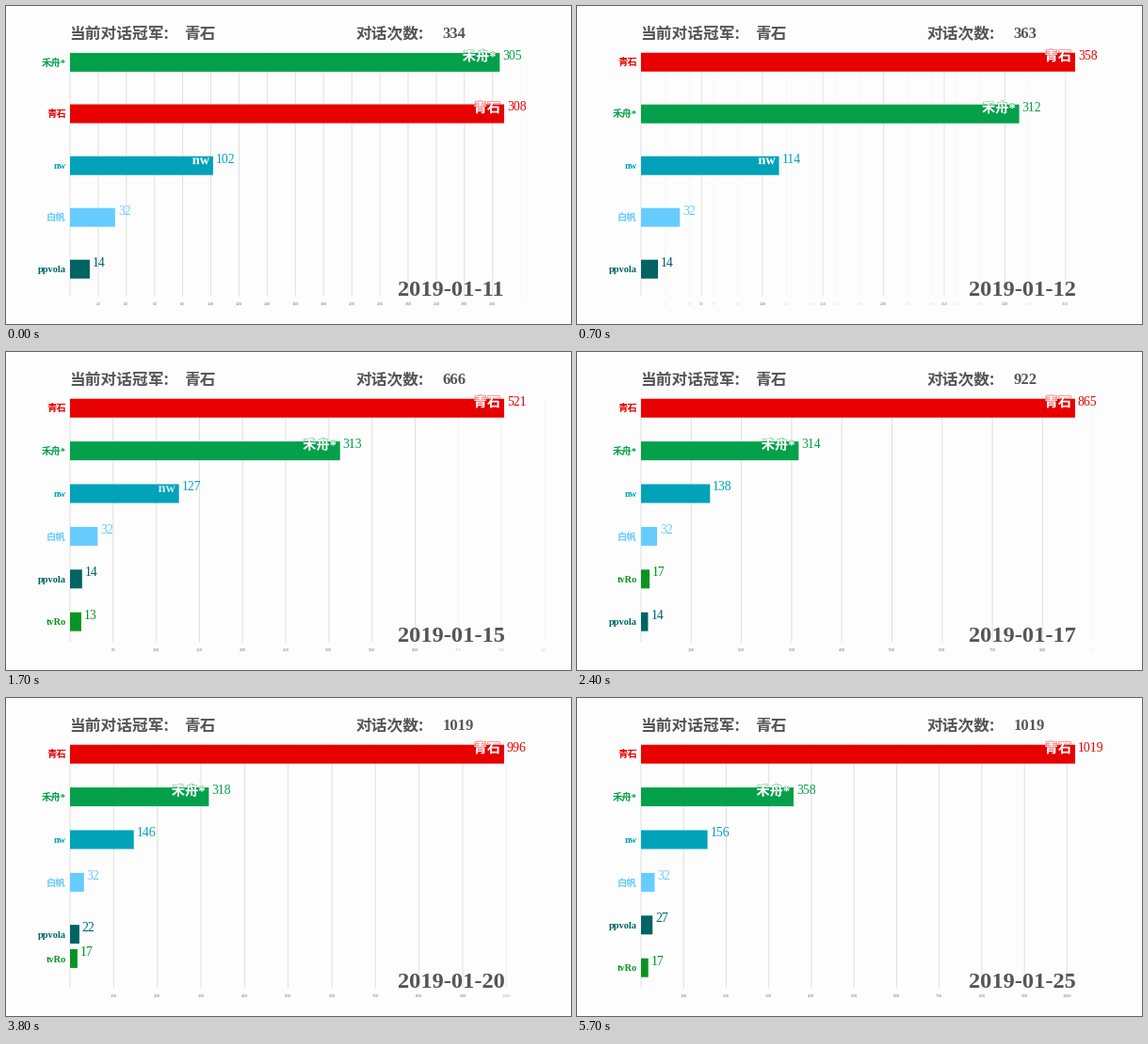
A matplotlib script for the animation above (6 s loop, 600 by 338 pixels).

```python
import math

import matplotlib.pyplot as plt
from matplotlib.animation import FuncAnimation
from matplotlib.patches import Rectangle
from matplotlib.patheffects import withStroke

W, H, DPI = 600, 338, 100
FRAMES, STEP = 60, 100
DAY_MS, LEAD = 400, 0.085      # length of a day, progress already made at t = 0
X0, SPAN, TOP, BAR = 68, 461, 49.7, 20
GREY = "#555555"
SERIF = ["Liberation Serif", "Noto Sans CJK JP"]
SANS = ["Noto Sans CJK JP"]

# name, colour, one value per day (first entry is the day before the start)
SERIES = [
    ("禾舟*", "#04a04a", [305, 306, 313, 313, 313, 313, 314, 314,
                        316, 317, 319, 319, 331, 354, 357, 360]),
    ("青石", "#e80000", [306, 334, 363, 405, 448, 666, 860, 922,
                       943, 963] + [1019] * 6),
    ("nw", "#00a2b9", [101, 108, 115, 119, 125, 130, 137, 144,
                       144, 145, 147, 147, 151, 155, 155, 158]),
    ("白帆", "#66ccff", [32] * 16),
    ("ppvola", "#006464", [14] * 10 + [27] * 6),
    ("tvRo", "#089422", [0] * 3 + [13] * 3 + [17] * 10),
]

fig = plt.figure(figsize=(W / DPI, H / DPI), dpi=DPI, facecolor="#fdfdfd")
ax = fig.add_axes([0, 0, 1, 1])


def px(n):
    return n * 72 / DPI


def lerp(a, b, f):
    return a + (b - a) * f


def ease(u):
    u = min(u / 0.94, 1)
    return 4 * u ** 3 if u < 0.5 else 1 - 4 * (1 - u) ** 3


def text(x, y, s, size, color=GREY, family=SERIF, weight="bold", **kw):
    return ax.text(x, y, s, fontsize=px(size), color=color, family=family,
                   weight=weight, va="baseline", **kw)


def values(day):
    return [s[2][day] for s in SERIES]


def row_tops(day):
    """Top edge of every bar on a day; None while a series is absent."""
    vals = values(day)
    shown = [i for i, v in enumerate(vals) if v]
    if day:
        shown.sort(key=lambda i: -vals[i])
    gap = 55 if len(shown) == 5 else 45.4
    return [TOP + gap * shown.index(i) if i in shown else None
            for i in range(len(vals))]


def ticks(top):
    raw = top / 11
    base = 10 ** math.floor(math.log10(raw))
    err = raw / base
    step = base * (10 if err >= 50 ** 0.5 else 5 if err >= 10 ** 0.5
                   else 2 if err >= 2 ** 0.5 else 1)
    return {round(i * step) for i in range(int(top / step) + 1)}


def draw_axis(old_max, new_max, f):
    scale = SPAN * lerp(1 / old_max, 1 / new_max, f)
    old, new = ticks(old_max), ticks(new_max)
    for v in old | new:
        alpha = 1 if v in old & new else f if v in new else 1 - f
        x = X0 + v * scale
        if x > W:
            continue
        ax.plot([x, x], [TOP, 308], color="#e0e0e0", lw=px(1),
                alpha=alpha, zorder=1, snap=False)
        if v:
            text(x, 318.5, str(v), 4.4, "#808080", ["Liberation Sans"],
                 "normal", ha="center", alpha=alpha)


def draw_bar(name, color, a, b, y, widths, f):
    alpha = 1 if a else f
    w = lerp(*widths, f)
    ax.add_patch(Rectangle((X0, y), w, BAR, fc=color, lw=0, alpha=alpha,
                           zorder=2, snap=False))
    text(64, y + 13.6, name, 10.4, color, ha="right", alpha=alpha)
    text(X0 + w + 2.9, y + 6.9, str(round(lerp(a, b, f))), 13.8, color,
         weight="normal", alpha=alpha)
    inner = lerp(*(float(v > 100) for v in widths), f)
    if inner:
        text(X0 + w - 4, y + 8.4, name, 14.3, "white", ha="right", alpha=inner,
             path_effects=[withStroke(linewidth=px(1), foreground=color,
                                      alpha=0.7 * inner)])


def draw(i):
    ax.clear()
    ax.set(xlim=(0, W), ylim=(H, 0))
    ax.axis("off")

    pos = LEAD + min(i, 57) * STEP / DAY_MS
    day = int(pos)
    f = pos - day
    old, new = values(day), values(day + 1)
    old_max, new_max = max(old), max(new)
    draw_axis(old_max, new_max, f)

    rows = zip(SERIES, old, new, row_tops(day), row_tops(day + 1))
    for (name, color, _), a, b, y0, y1 in rows:
        if y1 is None:
            continue
        y = y1 if y0 is None else lerp(y0, y1, ease(f))
        draw_bar(name, color, a, b, y,
                 (SPAN * a / old_max, SPAN * b / new_max), f)

    text(66.8, 34.6, "当前对话冠军:", 16.7, family=SANS)
    text(188.9, 34.6, SERIES[new.index(new_max)][0], 16.7, family=SANS)
    text(371.4, 34.6, "对话次数:", 16.7, family=SANS)
    text(463.4, 34.5, str(new_max), 16.5)
    text(415.6, 308.5, f"2019-01-{11 + day}", 24.5)
    return []


anim = FuncAnimation(fig, draw, frames=FRAMES, interval=STEP, repeat=True,
                     repeat_delay=0)
plt.show()
```
